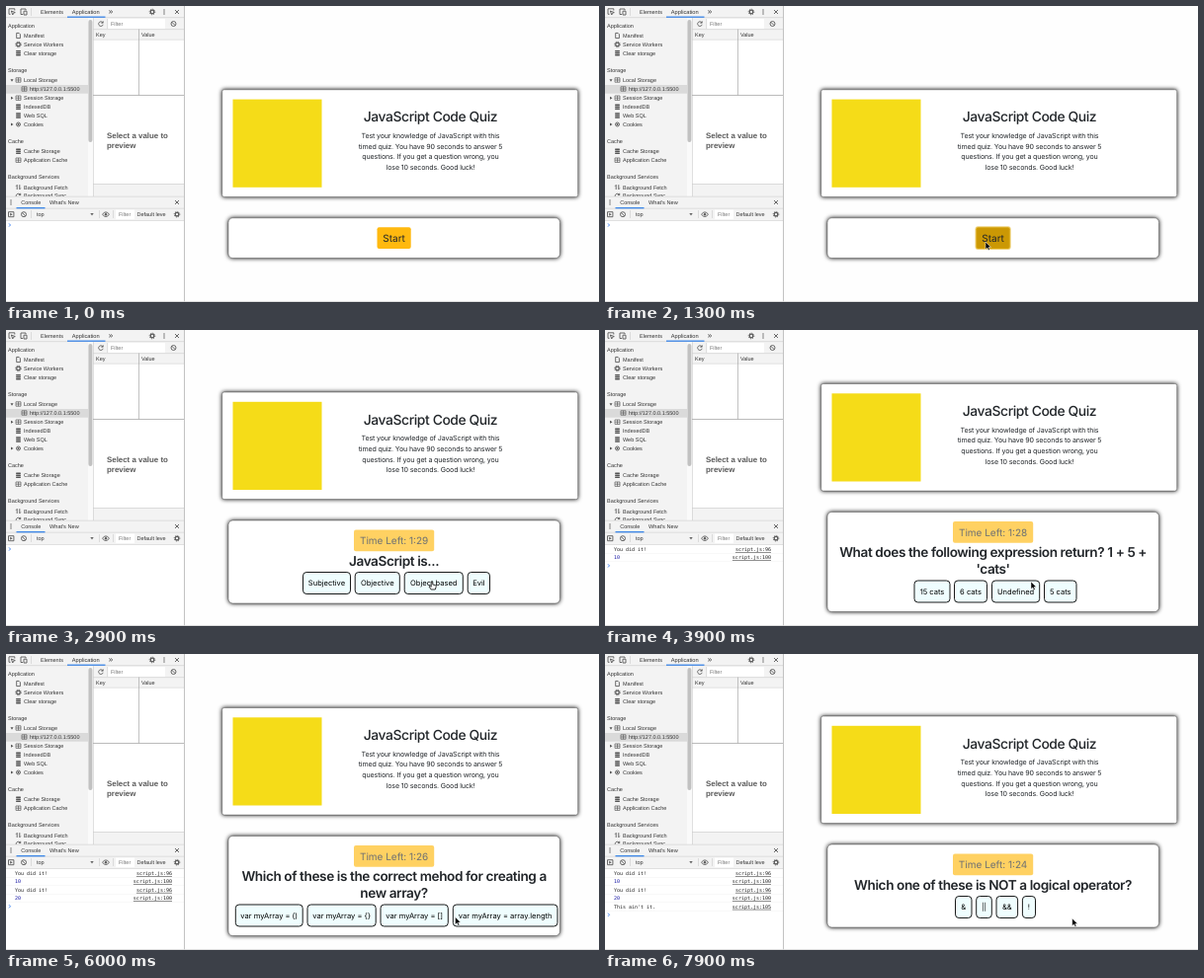
Write an HTML page that moves like this. It is 600x300 px and loops after 8 s.

```html
<!DOCTYPE html>
<html lang="en">
<head>
<meta charset="utf-8">
<title>JavaScript Code Quiz</title>
<style>
html, body { margin: 0; width: 100%; height: 100%; overflow: hidden; background: #fefefe; }
svg { display: block; width: 600px; height: 300px; }
text { text-rendering: geometricPrecision; white-space: pre; }
.ui { font-family: "Liberation Sans", Arial, sans-serif; font-size: 5.5px; fill: #333; }
.mono { font-family: "DejaVu Sans Mono", monospace; font-size: 5px; fill: #222; }
.page { font-family: Inter, sans-serif; fill: #212529; text-anchor: middle; }
.title { font-size: 13.9px; font-weight: 500; letter-spacing: -.03em; }
.body { font-size: 7.08px; letter-spacing: -.02em; }
.ask { font-size: 13.6px; font-weight: 600; letter-spacing: -.03em; }
.start { font-size: 10px; }
.answer { font-size: 7.55px; fill: #000; }
.card { fill: #fff; stroke: #555; stroke-width: .5; filter: drop-shadow(0 0 2px #000); }
.icon { fill: none; stroke: #5a5a5a; stroke-width: .9; }
</style>
</head>
<body>
<svg viewBox="0 0 600 300">
  <g id="tools"></g>
  <g id="log"></g>
  <g id="quiz"></g>
  <g id="arrow"><path d="M0 0V7.6L1.8 6L3 8.6L4.3 8L3.1 5.5H5.5Z" fill="#000" stroke="#fff" stroke-width=".5"/></g>
  <g id="hand"><path d="M-.8 .6Q0 -.4 .8 .6V3L3.6 3.7Q4.4 4 4.1 5.4L3.3 8H-.9L-3 5Q-2.6 4 -1.6 4.8L-.8 5.4Z" fill="#fff" stroke="#000" stroke-width=".8"/></g>
</svg>
<script>
const LOOP = 8000, STEP = 100;
const $ = id => document.getElementById(id);
const esc = s => s.replace(/&/g, "&amp;").replace(/</g, "&lt;");
const text = (s, x, y, cls, more = "") => `<text x="${x}" y="${y}" class="${cls}" ${more}>${esc(s)}</text>`;
const rect = (x, y, w, h, fill, more = "") =>
  `<rect x="${x}" y="${y}" width="${w}" height="${h}" fill="${fill}" ${more}/>`;
const icon = (d, more = "") => `<path class="icon" d="${d}" ${more}/>`;
const ring = (x, y, r, more = "") => `<circle class="icon" cx="${x}" cy="${y}" r="${r}" ${more}/>`;
const row = (x, y, w) => rect(x, y, w, .6, "#ccc");
const col = (x, y, h) => rect(x, y, .6, h, "#ccc");

// icons
const close = (x, y) => icon(`M${x - 2} ${y - 2}l4 4m0 -4l-4 4`);
const ban = (x, y) => ring(x, y, 2.5) + icon(`M${x - 1.8} ${y - 1.8}l3.6 3.6`);
const gear = (x, y) => ring(x, y, 1.8, 'style="stroke-width:1.3"') +
  ring(x, y, 2.8, 'stroke-dasharray="1.1 1.1"');
const dots = (x, y) => [-2, 0, 2].map(d => `<circle cx="${x}" cy="${y + d}" r=".7" fill="#5a5a5a"/>`).join("");
const db = (x, y) => [-2, 0, 2].map(d => rect(x - 2.5, y + d - .8, 5, 1.5, "#555", 'rx=".7"')).join("");
const grid = (x, y) => icon(`M${x - 2.5} ${y - 2.2}h5v4.4h-5zm0 2.2h5m-2.5 -2.2v4.4`, 'style="stroke-width:.7"');
const doc = (x, y) => icon(`M${x - 1.8} ${y - 2.6}h2.4l1.3 1.3v3.9h-3.7z`);
const cookie = (x, y) => ring(x, y, 2) + `<circle cx="${x}" cy="${y}" r="1" fill="#555"/>`;
const updown = (x, y) => icon(`M${x - 1.3} ${y + 2.4}v-4.6l-1 1.2m3.6 -1.4v4.6l1 -1.2`);
const sync = (x, y) => icon(`M${x + 2} ${y - 1}a2.3 2.3 0 1 0 .2 1.8m0 -3.4v1.8h-1.8`);

// label, left edge, baseline, icon
const TREE = [
  ["Application", 2, 21.8], ["Manifest", 18, 32, doc], ["Service Workers", 18, 41, gear],
  ["Clear storage", 18, 49.8, db], ["Storage", 2, 66.8], ["Local Storage", 18, 77, grid],
  ["http://127.0.0.1:5500", 24, 86, grid], ["Session Storage", 18, 95.2, grid],
  ["IndexedDB", 18, 104.2, db], ["Web SQL", 18, 113, db], ["Cookies", 18, 122, cookie],
  ["Cache", 2, 139], ["Cache Storage", 18, 149.2, db], ["Application Cache", 18, 158.2, grid],
  ["Background Services", 2, 175.2], ["Background Fetch", 18, 185.6, updown],
  ["Background Sync", 18, 194.4, sync]
];

function drawTools() {
  let s = rect(0, 0, 180, 194, "#f3f3f3") + rect(0, 80, 83, 8.7, "#dadada");
  s += TREE.map(([label, x, y, pic]) => text(label, x, y, "ui") + (pic ? pic(x - 5.5, y - 2) : "")).join("");
  s += '<path d="M4.5 74.2h3l-1.5 2.5zM5 91.7v3l2.5 -1.5zM5 118.5v3l2.5 -1.5z" fill="#555"/>';
  s += rect(83, 12, 5, 181, "#fafafa") + rect(83.4, 14, 4, 124, "#c1c1c1", 'rx="2"');

  s += rect(88, 34, 92, 146, "#fff") + rect(103, 13, 58, 10, "#fff") + col(88, 12, 181) + col(102.5, 13, 10);
  s += row(88, 23.5, 92) + row(88, 33.8, 92) + rect(88, 90.2, 92, .8, "#aaa") + row(88, 180, 92);
  s += rect(134.2, 23.5, .7, 67, "#aaa") + sync(96, 18) + ban(169.5, 18);
  s += text("Filter", 106, 20, "ui", 'style="fill:#777"') + text("Key", 91, 30.8, "ui") + text("Value", 137, 30.8, "ui");
  const big = 'style="font-size:7.9px;font-weight:bold;fill:#5a5a5a"';
  s += text("Select a value to", 102, 133.7, "ui", big) + text("preview", 102, 143.7, "ui", big);

  s += rect(0, 0, 180, 11.6, "#f3f3f3") + row(0, 11.5, 180) + rect(62, 10.6, 38.5, 1.1, "#1a73e8");
  s += icon("M4.5 8.3H3V2.8h5.8v1.7M5.3 5l4 1.6l-1.8 .6l-.7 1.8z");
  s += icon("M15 8.5V3h5v1.3M18 5.2h3v3.8h-3zM15 8.5h2") + col(25, 2, 8);
  s += text("Elements", 35, 7.8, "ui") + text("Application", 66.8, 7.8, "ui", 'style="font-size:5.7px"');
  s += text("»", 103.8, 8, "ui", 'style="font-size:8px"') + gear(148, 6) + dots(160, 6) + close(173, 6);

  s += rect(0, 193, 180, 24, "#f3f3f3") + rect(0, 217, 180, 83, "#fff");
  s += row(0, 192.8, 180) + row(0, 204.8, 180) + row(0, 217, 180) + rect(10.5, 204.2, 29, 1.1, "#1a73e8");
  s += dots(5, 199) + text("Console", 15.2, 200.8, "ui") + text("What's New", 44, 200.8, "ui", 'style="font-size:5.6px"') + close(173, 199);
  s += icon("M2.5 208.7h5.4v5h-5.4z") + '<path d="M4.2 209.7v3l2.4 -1.5z" fill="#5a5a5a"/>' + ban(18, 211.2);
  s += [25, 94, 108].map(x => col(x, 207, 8)).join("") + rect(111, 206.5, 19, 9.5, "#fff");
  s += text("top", 31, 213, "ui") + '<path d="M85.3 210h3.4l-1.7 2.6z" fill="#666"/>';
  s += icon("M97.5 211.2q3.5 -4.6 7 0q-3.5 4.6 -7 0z") + '<circle cx="101" cy="211.2" r="1.2" fill="#5a5a5a"/>';
  s += text("Filter", 114, 213, "ui", 'style="fill:#777"') + text("Default leve", 132.5, 213, "ui") + gear(173, 211.2);
  s += rect(180, 0, .9, 300, "#bbb") + rect(0, 299.2, 600, .8, "#ddd");
  $("tools").innerHTML = s;
}

const LOG = [["You did it!", 96], ["10", 100], ["You did it!", 96], ["20", 100], ["This ain't it.", 105]];

function drawLog(count) {
  const pitch = 8.45;
  let s = "";
  LOG.slice(0, count).forEach(([msg, line], i) => {
    const y = 224 + i * pitch;
    s += text(msg, 9, y, "mono", /^\d/.test(msg) ? 'style="fill:#1a1aa6"' : "");
    s += text("script.js:" + line, 168, y, "mono", 'text-anchor="end" text-decoration="underline"');
    s += rect(0, y + 2.2, 180, .4, "#eee");
  });
  const y = 222 + count * pitch;
  $("log").innerHTML = s + icon(`M3 ${y - 1.6}l1.5 1.6l-1.5 1.6`, 'style="stroke:#367cf1"');
}

// each answer: label, left edge, right edge
const QUIZ = [
  { at: 0, logs: 0, top: 84.8, ask: [], answers: [] },
  { at: 1400, logs: 0, top: 63, ask: ["JavaScript is..."],
    answers: [["Subjective", 300.5, 348.5], ["Objective", 353.2, 398.3], ["Object based", 403.2, 462.3], ["Evil", 467.2, 489.5]] },
  { at: 3300, logs: 2, top: 54.5, ask: ["What does the following expression return? 1 + 5 +", "'cats'"],
    answers: [["15 cats", 313, 349], ["6 cats", 353.5, 386.5], ["Undefined", 391.5, 439.7], ["5 cats", 444.5, 477]] },
  { at: 4700, logs: 4, top: 54.5, ask: ["Which of these is the correct mehod for creating a", "new array?"],
    answers: [["var myArray = ()", 232.3, 300.2], ["var myArray = {}", 305, 374.2], ["var myArray = []", 379, 447.3], ["var myArray = array.length", 452.3, 558]] },
  { at: 7200, logs: 5, top: 63, ask: ["Which one of these is NOT a logical operator?"],
    answers: [["&", 354.5, 371], ["||", 375.7, 391.3], ["&&", 396, 417.6], ["!", 422.4, 435.5]] }
];
const INTRO = ["Test your knowledge of JavaScript with this", "timed quiz. You have 90 seconds to answer 5",
  "questions. If you get a question wrong, you", "lose 10 seconds. Good luck!"];
const TICK = 2400, PRESS = 1100, HOVER = 900, PICK = 7000;

function drawQuiz(q, t) {
  const { top, ask, answers } = q, mid = 392.6;
  const low = top + 130, lines = ask.length;
  let s = rect(218.7, top, 360, 108.6, "#fff", 'class="card" rx="2"');
  s += rect(229.5, top + 9.8, 90, 89.2, "#f5dc18");
  s += text("JavaScript Code Quiz", 429.5, top + 32.6, "page title");
  s += INTRO.map((line, i) => text(line, 429.5, top + 49.2 + i * 10.7, "page body")).join("");
  s += rect(225, low, 335.4, lines ? 67 + lines * 17 : 40.7, "#fff", 'class="card" rx="4.5"');

  const on = t >= TICK, pressed = t >= PRESS && !lines;
  const half = on ? 40.6 : 17.1, y = low + 9.4;
  const fill = pressed ? "#cb9804" : t >= HOVER && !lines ? "#e0a800" : "#ffb90f";
  const label = on ? "Time Left: 1:" + (29 - Math.floor((t - TICK) / 1000)) : "Start";
  const glow = pressed ? 'stroke="#deaa0c" stroke-opacity=".55" stroke-width="2"' : "";
  s += `<g opacity="${lines ? .65 : 1}">` + rect(mid - half, y, half * 2, 21.8, fill, 'rx="2" ' + glow) +
    text(label, mid, y + 14.9, "page start") + "</g>";

  s += ask.map((line, i) => text(line, mid, low + 45.6 + i * 17, "page ask")).join("");
  const by = low + 35.5 + lines * 17;
  answers.forEach(([name, a, b], i) => {
    const picked = t >= PICK && lines === 2 && i === 3;
    const edge = picked ? 'stroke="#1359b8" stroke-width="1.4"' : 'stroke="#000" stroke-width=".9"';
    s += rect(a, by, b - a, 22, "#effdfe", `rx="3.6" ${edge}`) + text(name, (a + b) / 2, by + 13.9, "page answer");
  });
  $("quiz").innerHTML = s;
}

// pointer path: time, x, y
const PATH = [[200, 584, 260], [500, 520, 256], [900, 389, 241], [1100, 385, 239], [2100, 385, 239],
  [2700, 431, 255], [3900, 431, 255], [4400, 375.6, 259], [5500, 375.6, 259], [6200, 474, 268.5],
  [6400, 474, 268.5], [6800, 484, 268.8], [7300, 484, 268.8], [7700, 472.7, 268], [8000, 472.7, 268]];
const HIDDEN = [[0, 200], [1400, 2200]];
const HAND = [[2600, 3300], [4400, 4700], [6200, 7200]];
const within = (spans, t) => spans.some(([a, b]) => t >= a && t < b);

function drawPointer(t) {
  const i = Math.max(1, PATH.findIndex(p => p[0] > t));
  const [t0, x0, y0] = PATH[i - 1], [t1, x1, y1] = PATH[i];
  const k = Math.max(0, (t - t0) / (t1 - t0)), e = k * k * (3 - 2 * k);
  const show = within(HIDDEN, t) ? "" : within(HAND, t) ? "hand" : "arrow";
  for (const id of ["arrow", "hand"]) {
    $(id).setAttribute("transform", `translate(${x0 + (x1 - x0) * e} ${y0 + (y1 - y0) * e})`);
    $(id).style.display = id === show ? "" : "none";
  }
}

let last = -1;
function draw(now) {
  const t = Math.floor((now % LOOP) / STEP) * STEP;
  if (t !== last) {
    const q = QUIZ.filter(s => s.at <= t).pop();
    drawLog(q.logs);
    drawQuiz(q, t);
    drawPointer(t);
    last = t;
  }
}

drawTools();
const begin = performance.now();
const frame = () => { draw(performance.now() - begin); requestAnimationFrame(frame); };
frame();
</script>
</body>
</html>
```
